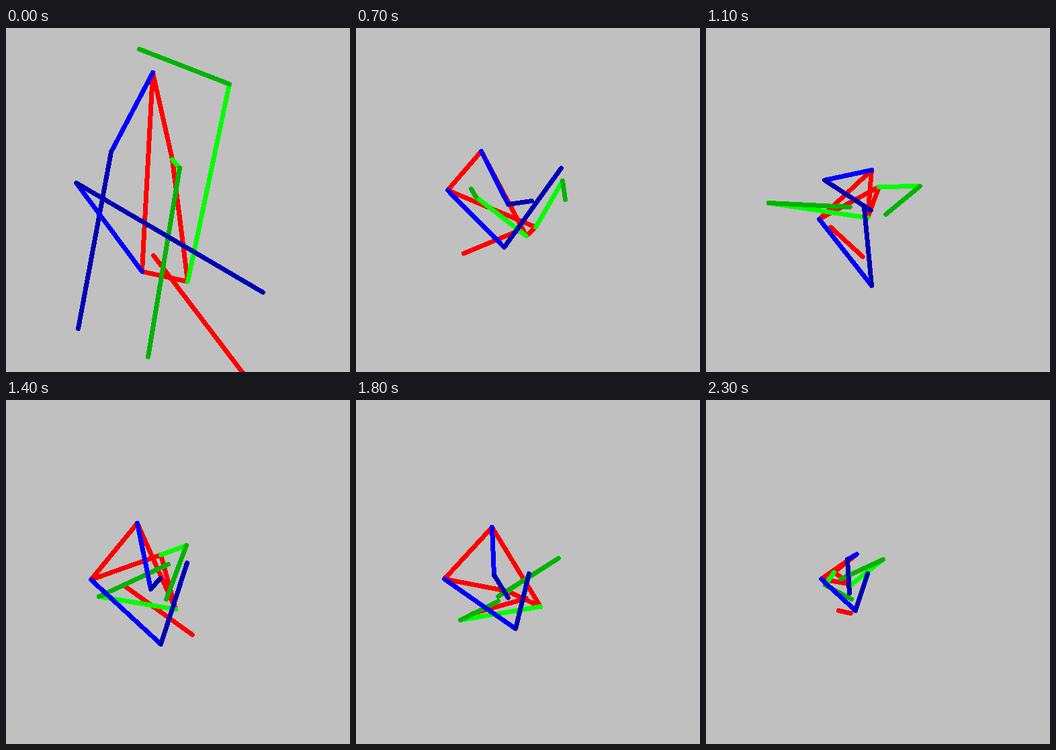
Recreate the animation shown at these times as an HTML page. Size 512x512 px, loop 2400 ms.

```html
<!DOCTYPE html>
<html lang="en">
<head>
<meta charset="utf-8">
<title>Stick figure</title>
<style>
  html, body { margin: 0; width: 100%; height: 100%; overflow: hidden; background: #c0c0c0; }
  svg { display: block; width: 512px; height: 512px; }
  path { fill: none; stroke-width: 7; stroke-linecap: round; stroke-linejoin: round; shape-rendering: crispEdges; }
</style>
</head>
<body>
<svg id="stage" viewBox="0.5 0.5 512 512"></svg>
<script>
const STEP = 100, STEPS = 24;
const RED = '#f00', GREEN = '#0f0', DARK_GREEN = '#00b400', BLUE = '#00f', DARK_BLUE = '#0000b4';
const lerp = (a, b, u) => a + (b - a) * u;

// Every joint travels along a path through its points, reaching them at these steps.
const stops = [0, 3, 7, 11, 14, 18, 23];
const joint = (...points) => (i, u) => points[i].map((v, k) => lerp(v, points[i + 1][k], u));

const shoulderA = joint([219, 67], [232, 227], [187, 184], [247, 212], [196, 184], [203, 190], [225, 230]);
const elbowA = joint([157, 185], [227, 297], [227, 263], [177, 227], [216, 282], [206, 261], [211, 238]);
const handA = joint([108, 448], [251, 330], [262, 258], [246, 272], [230, 266], [227, 295], [214, 288]);

const shoulderB = joint([203, 363], [164, 243], [137, 242], [169, 285], [127, 268], [132, 267], [172, 267]);
const elbowB = joint([105, 231], [262, 354], [221, 327], [247, 384], [231, 364], [238, 341], [223, 314]);
const handB = joint([383, 394], [268, 285], [306, 209], [236, 268], [270, 243], [258, 259], [241, 259]);

const hipC = joint([271, 378], [254, 198], [268, 297], [258, 237], [231, 231], [226, 285], [217, 275]);
const kneeC = joint([333, 84], [281, 250], [308, 228], [319, 236], [269, 217], [302, 236], [264, 238]);
const footC = joint([199, 32], [287, 294], [312, 256], [268, 278], [239, 297], [212, 293], [201, 267]);

const hipD = joint([248, 196], [232, 323], [254, 310], [241, 283], [253, 312], [275, 308], [191, 257]);
const kneeD = joint([259, 209], [168, 235], [179, 252], [94, 261], [139, 293], [156, 328], [178, 276]);
const footD = joint([212, 490], [224, 299], [172, 240], [215, 267], [242, 245], [212, 300], [217, 297]);

const neck = joint([220, 339], [222, 308], [243, 302], [186, 297], [178, 278], [254, 296], [198, 314]);
const crown = joint([360, 523], [179, 336], [161, 336], [234, 341], [278, 350], [175, 318], [216, 318]);

const stage = document.getElementById('stage');

function bone(color, ...joints) {
  const path = document.createElementNS('http://www.w3.org/2000/svg', 'path');
  path.setAttribute('stroke', color);
  stage.append(path);
  return (i, u) => path.setAttribute('d', 'M' + joints.map(j => j(i, u)).join('L'));
}

const limb = (upper, lower, root, bend, tip) => [bone(upper, root, bend), bone(lower, bend, tip)];

const bones = [
  bone(RED, neck, crown),
  bone(RED, shoulderA, shoulderB, hipC, hipD, shoulderA),
  ...limb(GREEN, DARK_GREEN, hipC, kneeC, footC),
  ...limb(GREEN, DARK_GREEN, hipD, kneeD, footD),
  ...limb(BLUE, DARK_BLUE, shoulderA, elbowA, handA),
  ...limb(BLUE, DARK_BLUE, shoulderB, elbowB, handB)
];

function draw(step) {
  const i = Math.max(0, stops.findIndex(s => s >= step) - 1);
  const u = (step - stops[i]) / (stops[i + 1] - stops[i]);
  bones.forEach(place => place(i, u));
}

const start = performance.now();
function tick() {
  draw(Math.floor((performance.now() - start) / STEP) % STEPS);
  requestAnimationFrame(tick);
}
tick();
</script>
</body>
</html>
```
